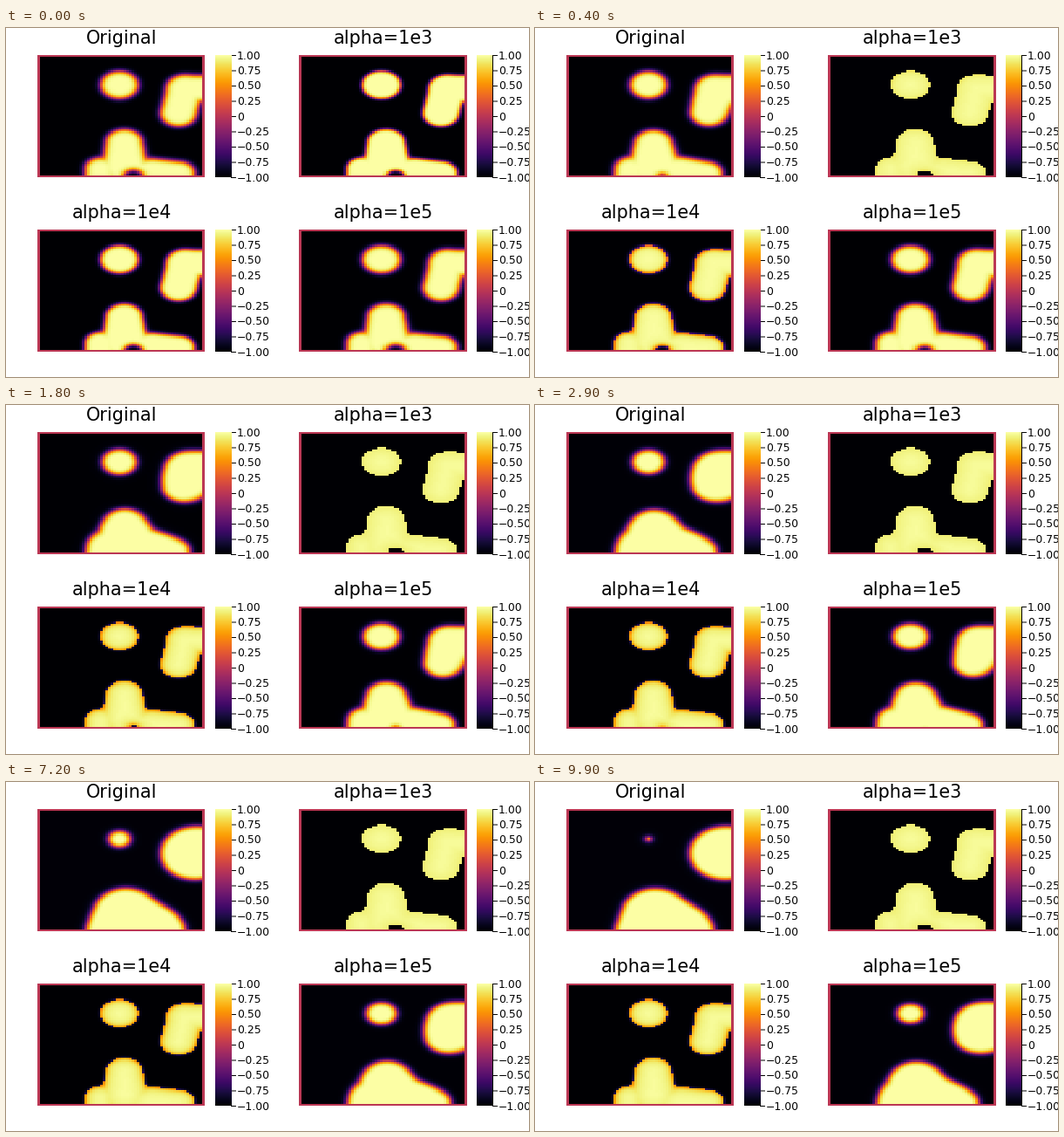
Write a matplotlib script that moves like this. It is 600 px wide and 400 px high and loops after 10 s.

```python
import numpy as np
import matplotlib.pyplot as plt
from matplotlib.animation import FuncAnimation

W, H, DPI = 600, 400, 100
FRAMES, STEP = 100, 100
N = 64                        # cells per side
PW, PH = 192, 140             # heatmap size in pixels
X0, Y0 = 36, 31               # top left heatmap corner

plt.rcParams["font.family"] = "DejaVu Sans"

axis = np.arange(N) + 0.5
GX, GY = np.meshgrid(axis, axis)


# Distances are in cells, positive inside a shape.
def disc(x, y, r):
    return r - np.hypot(GX - x, GY - y)


def capsule(a, b):
    """Hull of two discs, each given as (x, y, r)."""
    a, b = np.array(a), np.array(b)
    return np.max([disc(*(a + s * (b - a))) for s in np.linspace(0, 1, 60)],
                  axis=0)


def fuse(*shapes, k=0.8):
    """Union with rounded inner corners."""
    return k * np.logaddexp.reduce([s / k for s in shapes])


RIGHT_START = fuse(capsule((54, 30.4, 7.0), (56.5, 17.6, 7.0)),
                   capsule((56.5, 17.6, 7.0), (72, 17.5, 7.0)), k=0.5)
RIGHT_END = disc(61.1, 23.1, 14.1)
BOTTOM_START = fuse(capsule((33.2, 46, 7.1), (33.5, 58, 8.6)),
                    capsule((24, 59.6, 5.8), (24, 70, 6)),
                    capsule((44, 63, 8.8), (54, 62, 6.3)))
BOTTOM_END = capsule((34, 54.5, 12.9), (37.5, 66, 19.2))


def distance(merge, spot, hole):
    """Distance to the interface after a share of the coarsening."""
    def mix(a, b):
        return a + merge * (b - a)
    bottom = np.minimum(mix(BOTTOM_START, BOTTOM_END), -disc(36.7, 64, hole))
    right = mix(RIGHT_START, RIGHT_END)
    return np.maximum.reduce([bottom, right, disc(31.4, 15.7, spot)])


def ease(t, tau):
    return 1 - np.exp(-t / tau)


def coarsen(t, tau, life, fill, width):
    """Blobs merge, the small spot evaporates and the hole fills."""
    merge = ease(t, tau)
    spot = 7.2 * (1 - t / life) ** 0.42
    d = distance(merge, spot, 3.5 - fill * t)
    return np.tanh(d / width) + 0.03 * merge


def sharpen(d, t, tau, width, inside, outside):
    """The interface steepens to a fixed final profile."""
    s = ease(t, tau)
    final = np.where(d > 0, inside(np.abs(d)), outside(np.abs(d)))
    return (1 - s) * np.tanh(d / width) + s * final


# Times in seconds.
def plain(t):
    return coarsen(t, 2.7, 9.95, 5.5, 1.4)


def alpha_1e3(t):
    return sharpen(distance(0, 7.3, 3.4), t, 0.13, 0.85,
                   lambda d: 1 - 0.1 * np.exp(-d / 5), lambda d: -0.99)


def alpha_1e4(t):
    return sharpen(distance(0, 7.3, 3.5 - 0.9 * t), t, 0.4, 1.1,
                   lambda d: 1 - 0.15 * np.exp(-d / 4) - 0.4 * np.exp(-d / 0.8),
                   lambda d: -1 + 0.3 * np.exp(-d / 0.5))


def alpha_1e5(t):
    return coarsen(t, 7.7, 17, 1.55, 1.35)


def field(model, t):
    u = model(t)
    u[[0, -1], :] = 0
    u[:, [0, -1]] = 0
    return u


fig = plt.figure(figsize=(W / DPI, H / DPI), dpi=DPI, facecolor="white")


def pixel_axes(x, y, w, h):
    ax = fig.add_axes([x / W, 1 - (y + h) / H, w / W, h / H])
    ax.axis("off")
    return ax


page = pixel_axes(0, 0, W, H)
page.set(xlim=(0, W), ylim=(H, 0))


def label(x, y, s, px, **kw):
    page.text(x, y, s, fontsize=px * 72 / DPI, color="black",
              va="baseline", **kw)


def line(xs, ys):
    page.plot(xs, ys, color="black", lw=72 / DPI, solid_capstyle="butt",
              snap=False)


def show(ax, data):
    return ax.imshow(data, cmap="inferno", vmin=-1, vmax=1, aspect="auto",
                     interpolation="nearest")


def panel(col, row, title, model):
    x, y = X0 + 300 * col, Y0 + 200 * row
    label(x + PW / 2 + 0.5, y - 13, title, 20.8, ha="center")
    show(pixel_axes(x + 204, y, 18, PH), np.linspace(1, -1, 256)[:, None])
    line([x + 222.5] * 2, [y, y + PH + 1])
    for k in range(9):
        v, ty = 1 - k / 4, y + 0.5 + k * PH / 8
        line([x + 222, x + 228], [ty, ty])
        text = f"{v:.2f}".replace("-", "\u2212") if v else "0"
        label(x + 229, ty + 4, text, 12.4, ha="left")
    return show(pixel_axes(x, y, PW, PH), field(model, 0)), model


panels = [
    panel(0, 0, "Original", plain),
    panel(1, 0, "alpha=1e3", alpha_1e3),
    panel(0, 1, "alpha=1e4", alpha_1e4),
    panel(1, 1, "alpha=1e5", alpha_1e5),
]


def update(i):
    for im, model in panels:
        im.set_data(field(model, i * STEP / 1000))
    return [im for im, _ in panels]


anim = FuncAnimation(fig, update, frames=FRAMES, interval=STEP,
                     repeat=True, repeat_delay=0, blit=False)
plt.show()
```
